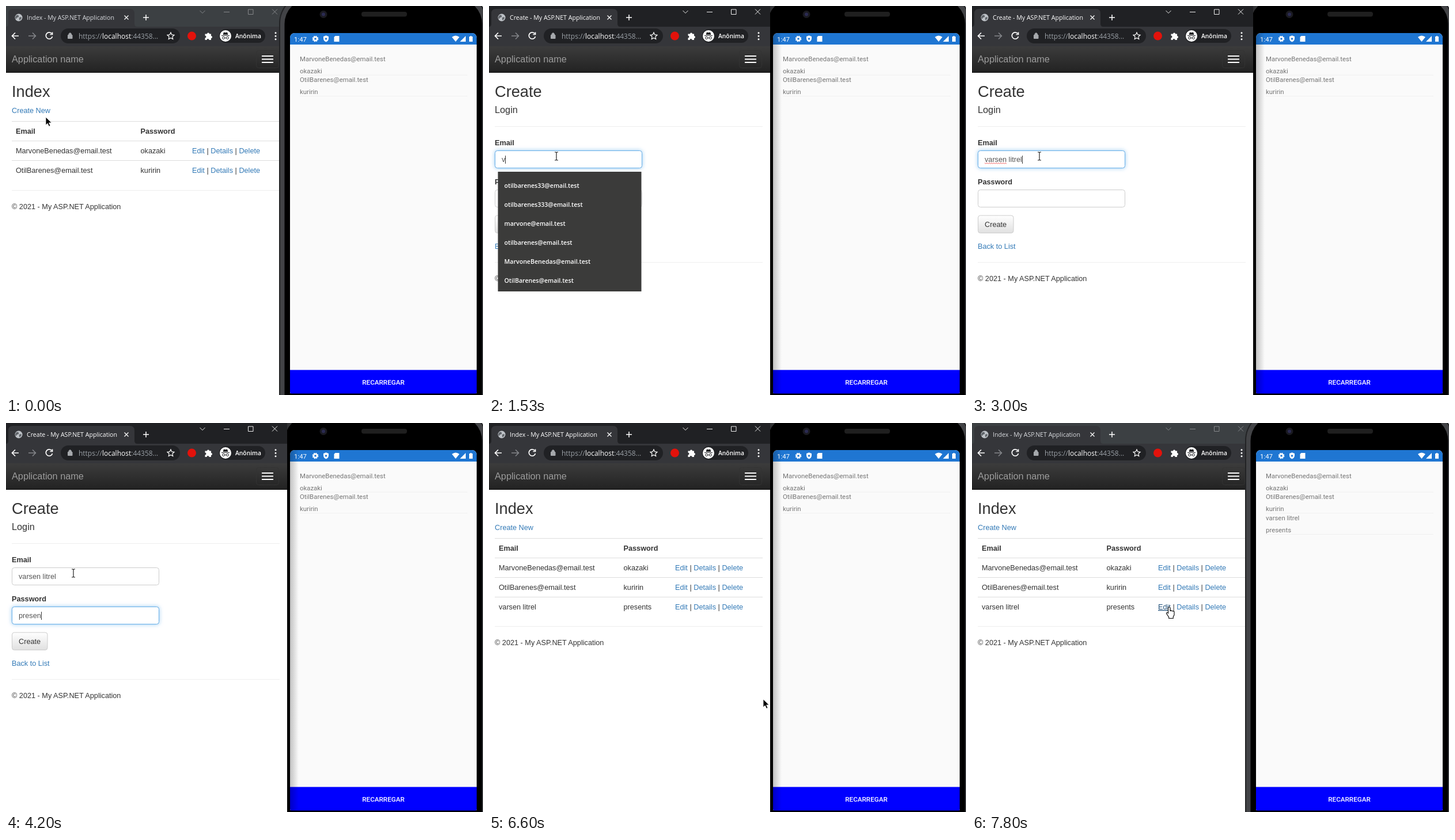
Recreate the animation shown at these times as an HTML page. Size 828 by 676 pixels, loop 8000 ms.

```html
<!DOCTYPE html>
<html lang="pt">
<head>
<meta charset="utf-8">
<title>Login list</title>
<style>
  html, body { margin: 0; width: 828px; height: 676px; overflow: hidden; background: #fff; }
  svg { display: block; }
  text { white-space: pre; }
  .chrome { font-family: "Open Sans", sans-serif; font-size: 10.6px; fill: #fff; }
  .page { font: 12.7px "Liberation Sans", Arial, sans-serif; fill: #333; }
  .page .b { font-weight: bold; }
  .page .h2 { font-size: 27.2px; }
  .page .h4 { font-size: 16.3px; }
  .page .link { fill: #337ab7; }
  .page .link.hover { fill: #23527c; text-decoration: underline; }
  .page .value { fill: #555; }
  .rule { stroke: #ddd; }
  .soft { stroke: #eee; }
  .field { fill: #fff; stroke: #ccc; }
  .focus { fill: #fff; stroke: #66afe9; filter: drop-shadow(0 0 3.5px rgba(102,175,233,.7)); }
  .phone { font: 11.4px Roboto, sans-serif; fill: #757575; }
  .line { fill: none; stroke: #fff; }
  #menu { font: 600 10.6px "Open Sans", sans-serif; fill: #fff; }
</style>
</head>
<body>
<svg width="828" height="676" viewBox="0 0 828 676">
  <defs>
    <linearGradient id="nav" x2="0" y2="1"><stop stop-color="#3c3c3c"/><stop offset="1" stop-color="#222"/></linearGradient>
    <linearGradient id="btn" x2="0" y2="1"><stop stop-color="#fff"/><stop offset="1" stop-color="#e0e0e0"/></linearGradient>
    <linearGradient id="shade"><stop stop-opacity=".3"/><stop offset="1" stop-opacity="0"/></linearGradient>
    <pattern id="wave" width="4" height="3" patternUnits="userSpaceOnUse"><path d="M0 2.5L2 .5 4 2.5" fill="none" stroke="#e33" stroke-width=".9"/></pattern>
  </defs>

  <g id="phone" class="phone">
    <rect x="474" y="-21" width="362" height="760" rx="51" fill="#222325"/>
    <rect x="476" y="-19" width="358" height="760" rx="49" fill="#424346"/>
    <rect x="483.500" y="-12" width="343" height="760" rx="43" fill="#000"/>
    <rect x="617" y="10" width="79" height="8.500" rx="4" fill="#1f1f1f"/>
    <circle cx="551" cy="14.500" r="6.500" fill="#1a1a20"/><circle cx="551" cy="14.500" r="3" fill="#2b2b52"/>
    <path d="M493 673V56q0-9 9-9h306q9 0 9 9v617z" fill="#fafafa"/>
    <path d="M493 67V56q0-9 9-9h306q9 0 9 9v11z" fill="#1f76d2"/>
    <g fill="#fff">
      <text x="500" y="61.500">1:47</text>
      <circle cx="537" cy="57" r="3" fill="none" stroke="#fff" stroke-width="2.400"/>
      <circle cx="537" cy="57" r="4.600" fill="none" stroke="#fff" stroke-width="1.500" stroke-dasharray="2.200 1.400"/>
      <path d="M551 53l4.500-1.800 4.500 1.800v4q-.5 4-4.500 5.500-4-1.500-4.500-5.500zM571.500 52h7v10h-9v-8zM774 54q6.500-5 13 0l-6.500 8zM788 62h10V52zM804 53h2v-1h2v1h2v9h-6z"/>
      <circle cx="555.500" cy="57" r="1.700" fill="#1f76d2"/>
    </g>
    <g id="items"></g>
    <path id="reload" d="M493 632.500h324V671q0 2.500-2.500 2.500h-319q-2.500 0-2.500-2.500z"/>
    <text x="655" y="657.500" text-anchor="middle" font-size="11.700" font-weight="500" fill="#fff">RECARREGAR</text>
  </g>

  <rect id="shadow" x="488" width="20" height="676" fill="url(#shade)"/>
  <rect width="488" height="676" fill="#fff"/>

  <g class="chrome">
    <rect id="titlebar" width="488" height="40"/>
    <path d="M0 36q4 0 4-5V13q0-8 8-8h203q8 0 8 8v18q0 5 5 5h260v34H0z" fill="#35363a"/>
    <circle cx="22" cy="20" r="6.500" fill="#bdc1c6"/>
    <path d="M17 17q4-3 5 0t-3 3q-1 4-3 1zM23 20q4-2 4 1l-3 4q-2-2-1-5z" fill="#5f6368"/>
    <text id="title" x="36" y="24"></text>
    <path class="line" d="M205.500 16.500l7 7m0-7l-7 7" stroke-width="1.300"/>
    <path class="line" d="M238 20h10m-5-5v10" stroke-width="1.500"/>
    <g id="controls" fill="none"><path d="M336.500 8l4.500 4.500L345.500 8M378 10.500h10M420.500 6h8.500v8.500h-8.500zM462 5.500l9 9m0-9l-9 9"/></g>
    <path class="line" d="M22 52H11m5-5.500L10.500 52l5.500 5.500" stroke-width="1.700"/>
    <path class="line" d="M39 52h12m-5-5.500l5.500 5.500-5.500 5.500" stroke-width="1.500" style="stroke:#85878b"/>
    <path class="line" d="M79.500 48a5.700 5.700 0 1 0 1 5M80.500 45.500v4h-4.200" stroke-width="1.700"/>
    <rect x="95" y="39" width="207" height="26" rx="13" fill="#202124"/>
    <path d="M107.500 50.500h7.500v6h-7.500zM109 50.500v-2q2.250-3.500 4.500 0v2" fill="#a5a8ac" stroke="#a5a8ac" fill-rule="evenodd"/>
    <text x="126" y="56.500" style="font-size:12px;fill:#9aa0a6">https://<tspan fill="#fff">localhost</tspan>:44358...</text>
    <path class="line" d="M286 46l1.800 3.900 4.200.5-3.100 2.900.8 4.200-3.700-2.100-3.700 2.100.8-4.200-3.100-2.900 4.200-.5z" stroke-width="1.200"/>
    <circle cx="322.500" cy="52" r="7.500" fill="#e3120b"/>
    <path d="M345.500 48.500h3.500a2 2 0 1 1 4 0h3V52a2 2 0 1 1 0 4v3h-3.500a2 2 0 1 0-4 0h-3v-3.500a2 2 0 1 0 0-4z"/>
    <rect x="370" y="40" width="80" height="24" rx="12" fill="#202124"/>
    <circle cx="381" cy="52" r="10"/>
    <path d="M374 51h14v1h-14zM376.500 50l1.500-4.500 3 .7 3-.7 1.500 4.500z" fill="#202124"/>
    <path d="M379.500 55.500h3" stroke="#202124"/><circle cx="377.500" cy="55.500" r="2" fill="none" stroke="#202124"/><circle cx="384.500" cy="55.500" r="2" fill="none" stroke="#202124"/>
    <text x="398" y="56" font-weight="600" style="font-size:10.300px">Anônima</text>
    <path d="M468 46.700v0M468 52.200v0M468 57.700v0" stroke="#fff" stroke-width="3" stroke-linecap="round"/>
  </g>

  <g class="page">
    <rect y="70" width="488" height="46" fill="url(#nav)"/>
    <path d="M0 115.500h488" stroke="#080808"/>
    <text class="h4" x="10" y="98" style="fill:#9d9d9d">Application name</text>
    <rect x="434.500" y="77.500" width="39" height="30" rx="4" fill="none" stroke="#333"/>
    <path class="line" d="M444 87h20M444 92.500h20M444 98h20" stroke-width="1.800"/>

    <g id="index">
      <text class="h2" x="10" y="158">Index</text>
      <text class="link" id="createNew" x="10" y="186">Create New</text>
      <path class="rule" d="M10 200.500h465"/>
      <text class="b" x="17" y="222">Email</text><text class="b" x="233.500" y="222">Password</text>
      <g id="rows"></g>
    </g>

    <g id="create">
      <text class="h2" x="10" y="158">Create</text>
      <text class="h4" x="10" y="186">Login</text>
      <path class="soft" d="M10 209.500h465"/>
      <text class="b" x="10" y="242">Email</text>
      <text class="b" x="10" y="309.500">Password</text>
      <g id="fields"></g>
      <rect id="submit" x="10.500" y="364" width="61.500" height="30.500" rx="4"/>
      <text x="22" y="384">Create</text>
      <text class="link" x="10" y="422">Back to List</text>
    </g>

    <g id="footer">
      <path class="soft" d="M10 0h465"/>
      <text x="10" y="32.500">© 2021 - My ASP.NET Application</text>
    </g>
  </g>

  <g id="menu"><rect x="15.500" y="288" width="249" height="208" fill="#3b3b3a"/></g>
  <use id="front" href="#phone"/>

  <g id="cursor">
    <path id="arrow" d="M0 0v14l3.200-3 2.400 5.200 2.400-1-2.400-5.200h4.600z" stroke="#fff" stroke-width=".8"/>
    <path id="hand" d="M-2 1q2-2.500 3.500 0v5.500l1.500-.6 2 .8 1.800.2 1.700 1v5.600l-1.800 3.500v2.500h-7.500v-2l-4.200-6.500q0-2 2-1.500l1 1z" fill="#fff" stroke="#000" stroke-width="1.100"/>
    <path id="beam" d="M-3-7h2l1 1 1-1h2M-3 7h2l1-1 1 1h2M0-6V6" fill="none" stroke="#222" stroke-width="1.200"/>
  </g>
</svg>

<script>
const LOOP = 8000;
const $ = id => document.getElementById(id);
const show = (id, on) => { $(id).style.display = on ? '' : 'none'; };
const set = (id, attrs) => { for (const k in attrs) $(id).setAttribute(k, attrs[k]); };

const users = [
  ['MarvoneBenedas@email.test', 'okazaki'],
  ['OtilBarenes@email.test', 'kuririn'],
  ['varsen litrel', 'presents'],
];
const suggestions = ['otilbarenes33', 'otilbarenes333', 'marvone', 'otilbarenes', 'MarvoneBenedas', 'OtilBarenes'];

$('items').innerHTML = users.map(([mail, pass], i) => `
  <g id="item${i}" transform="translate(510 ${95.5 + i * 36.7})">
    <text>${mail}</text><text y="21">${pass}</text><path d="M0 24.500h291" stroke="#f0f0f0"/>
  </g>`).join('');

$('rows').innerHTML = users.map(([mail, pass], i) => `
  <g id="row${i}" transform="translate(0 ${Math.round(256 + i * 33.75)})">
    <path class="rule" d="M10-21.500h465"/>
    <text x="17">${mail}</text><text x="233.500">${pass}</text>
    <text x="323"><tspan class="link" id="edit${i}">Edit</tspan> | <tspan class="link">Details</tspan> | <tspan class="link">Delete</tspan></text>
  </g>`).join('');

$('fields').innerHTML = ['mail', 'pass'].map((id, i) => `
  <g transform="translate(0 ${251 + i * 68})">
    <rect class="field" x="10.500" y=".5" width="255" height="30" rx="4"/>
    <rect class="focus" id="${id}Focus" x="10.500" y=".5" width="255" height="30" rx="4"/>
    <text class="value" id="${id}" x="22" y="20"></text>
    <rect id="${id}Wave" x="22" y="21" height="3" fill="url(#wave)"/>
    <rect id="${id}Caret" y="9" width="1" height="14" fill="#333"/>
  </g>`).join('');

$('menu').innerHTML += suggestions.map((name, i) =>
  `<text x="26.500" y="${316 + i * 33}">${name}@email.test</text>`).join('');

// Last value whose time has come.
const step = (list, t) => list.filter(([at]) => at <= t).pop()[1];

// Linear path through [time, x, y] points.
function along(points, t) {
  const i = points.findIndex(p => p[0] > t);
  if (i < 0) return points[points.length - 1].slice(1);
  const a = points[i - 1], b = points[i], k = (t - a[0]) / (b[0] - a[0]);
  return [1, 2].map(j => a[j] + (b[j] - a[j]) * k);
}
const ramp = (from, to, t) => Math.min(1, Math.max(0, (t - from) / (to - from)));

const cursorPath = [
  [0, 69, 193], [70, 69, 193], [270, 61, 183], [600, 61, 183], [1000, 113.5, 266], [1100, 113.5, 266],
  [1200, 117, 261], [4870, 117, 261], [5400, 60, 374.5], [5800, 60, 374.5],
  [6130, 200, 342], [6600, 476, 480], [6670, 476, 480], [6930, 584, 645],
  [7270, 584, 645], [7800, 342.5, 320],
];
const cursorKind = [
  [0, 'arrow'], [200, 'hand'], [670, 'arrow'], [930, 'beam'], [4950, 'arrow'],
  [5140, 'beam'], [5280, 'arrow'], [5340, 'hand'], [5800, 'arrow'], [7730, 'hand'],
];
const mailKeys = [1530, 1600, 2000, 2100, 2200, 2300, 2400, 2600, 2600, 2800, 2930, 2930, 3000];
const passKeys = [...users[2][1]].map((_, i) => 3730 + i * 600 / 7);

function drawField(id, value, keys, focus, waveFrom, t) {
  const typed = value.slice(0, keys.filter(at => at <= t).length);
  const text = $(id);
  if (text.textContent !== typed) text.textContent = typed;
  const width = n => n ? text.getSubStringLength(0, n) : 0;
  $(id + 'Focus').style.opacity = focus;
  show(id + 'Caret', focus > .5);
  show(id + 'Wave', focus > .5 && typed.length >= waveFrom);
  set(id + 'Caret', { x: Math.round(22 + width(typed.length)) });
  set(id + 'Wave', { width: width(Math.min(typed.length, value.split(' ')[0].length)) });
}

function draw(t) {
  const creating = t >= 670 && t < 5600;
  const saved = t >= 5600;
  const active = t >= 200 && t < 6870;

  show('front', !active);
  show('shadow', active);
  set('titlebar', { fill: active ? '#202124' : '#3c4043' });
  set('controls', { stroke: active ? '#eee' : '#85878a' });
  $('title').textContent = (creating ? 'Create' : 'Index') + ' - My ASP.NET Application';
  set('title', { fill: active ? '#fff' : '#dadce0' });

  show('index', !creating);
  show('create', creating);
  show('row2', saved);
  set('footer', { transform: `translate(0 ${creating ? 445.5 : saved ? 353.5 : 320.5})` });
  $('createNew').classList.toggle('hover', t >= 200 && t < 670);
  $('edit2').classList.toggle('hover', t >= 7730);

  if (creating) {
    const toPass = ramp(3200, 3330, t);
    drawField('mail', users[2][0], mailKeys, ramp(1130, 1270, t) * (1 - toPass), 7, t);
    drawField('pass', users[2][1], passKeys, toPass, 8, t);
    const hover = t >= 5340;
    set('submit', { fill: hover ? '#e0e0e0' : 'url(#btn)', stroke: hover ? '#adadad' : '#ccc' });
  }
  $('menu').style.opacity = step([[0, 0], [1200, .6], [1270, 1], [1600, .55], [1670, .14], [1730, 0]], t);

  show('item2', t >= 7400);
  set('reload', { fill: t >= 7070 && t < 7270 ? '#3030ff' : '#00f' });

  const kind = step(cursorKind, t);
  for (const name of ['arrow', 'hand', 'beam']) show(name, name === kind);
  set('cursor', { transform: `translate(${along(cursorPath, t)})` });
}

function loop() {
  draw(performance.now() % LOOP);
  requestAnimationFrame(loop);
}
loop();
</script>
</body>
</html>
```
